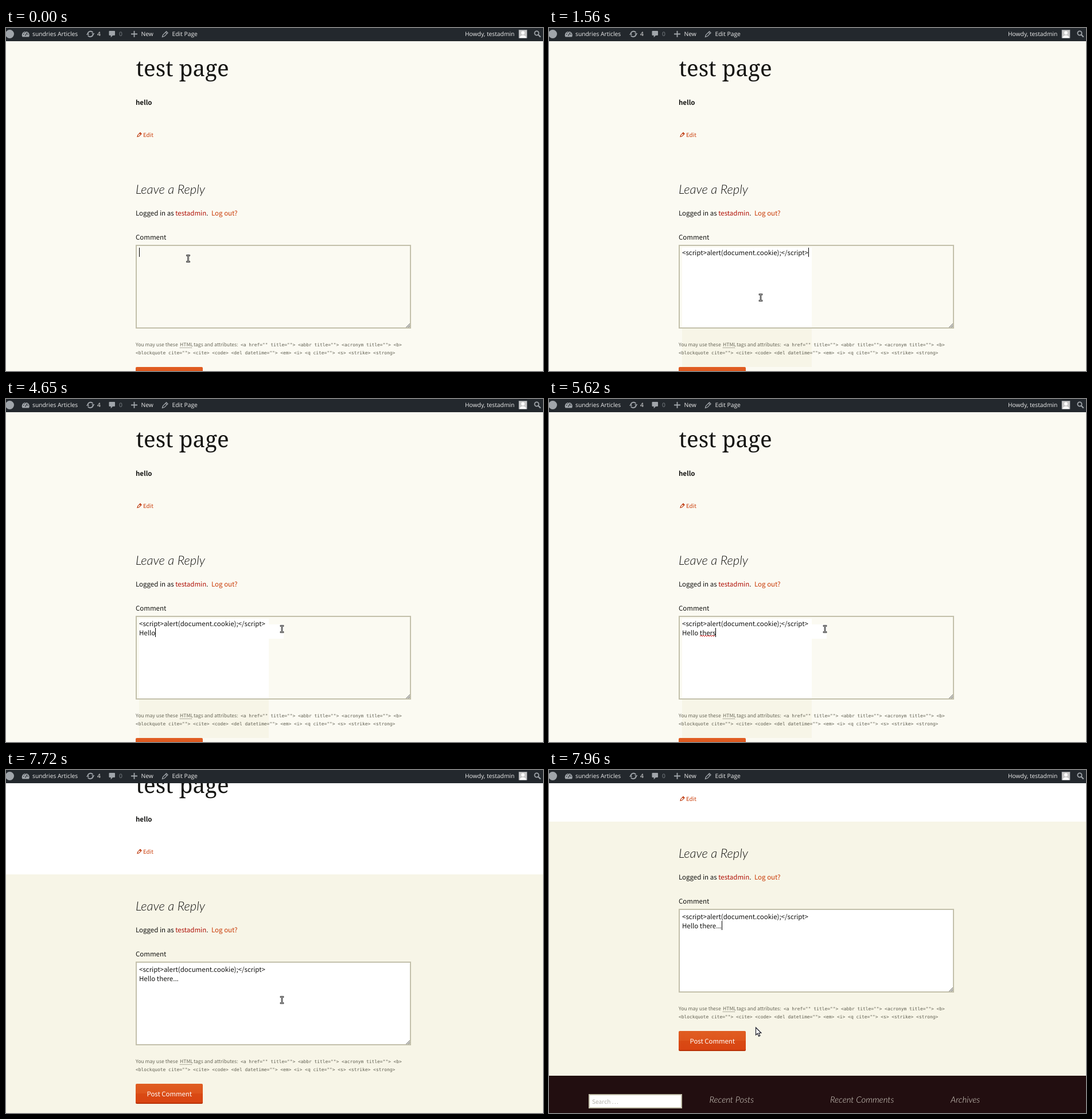
An HTML page for the animation above (8000 ms loop, 936 px wide and 598 px high).

```html
<!DOCTYPE html>
<html lang="en">
<head>
<meta charset="utf-8">
<title>Comment form</title>
<style>
  html, body { margin: 0; width: 100%; height: 100%; overflow: hidden; background: #fbfaf2; }
  svg { display: block; width: 936px; height: 598px; }
  text { white-space: pre; text-rendering: geometricPrecision; fill: #141412;
    font: 11.5px "Noto Sans CJK JP", "Noto Sans CJK SC", "Noto Sans CJK", "Noto Sans", sans-serif; }
  .title { font: 500 38.6px "Noto Serif", serif; }
  .strong { font-weight: 700; }
  .light { font: italic 300 22px Lato, sans-serif; }
  .foot .light { font-size: 15px; fill: #e2ddd2; }
  .link { fill: #ca3c08; }
  .user { fill: #b01208; }
  .edit { font-size: 9.7px; }
  .hint { font-size: 8.6px; fill: #686758; }
  .code { font: 7.92px "DejaVu Sans Mono", monospace; fill: #5f5e50; }
  .button { fill: #fff; font-size: 11.4px; }
  .search { font-size: 10.2px; fill: #b3b0aa; }
  .bar text { font: 10.3px "Open Sans", sans-serif; fill: #eee; }
  .bar .dim { fill: #7f858a; }
  .menu text { font: 10.3px "Open Sans", sans-serif; fill: #2e3436; }
  .menu .off { fill: #a5a7a6; }
  .menu .lit { fill: #fff; }
  .icon { fill: none; stroke: #a0a5aa; stroke-width: 1.8; }
  .solid { fill: #a0a5aa; }
</style>
</head>
<body>
<svg viewBox="0 0 936 598">
  <defs>
    <linearGradient id="orange" x2="0" y2="1">
      <stop offset="0" stop-color="#e05d22"/>
      <stop offset=".5" stop-color="#de551c"/>
      <stop offset=".53" stop-color="#d94a14"/>
      <stop offset="1" stop-color="#d94412"/>
    </linearGradient>
  </defs>

  <g id="page">
    <g id="sections">
      <rect y="-200" width="936" height="426" fill="#fff"/>
      <rect y="226" width="936" height="443" fill="#f7f5e7"/>
      <rect x="227" y="379" width="478" height="144" fill="#fff"/>
    </g>
    <g id="flat">
      <rect width="936" height="598" fill="#fbfaf2"/>
      <g id="patches"></g>
    </g>

    <text class="title" x="226.500" y="84">test page</text>
    <text class="strong" x="226" y="134">hello</text>
    <path d="M229 189.500l.7-2.800 4.300-4.300 2.100 2.100-4.300 4.300zM232.800 183.500l2.100 2.100" fill="none" stroke="#bc360a" stroke-width="1.100"/>
    <text class="link edit" x="239" y="190">Edit</text>
    <text class="light" x="226" y="289">Leave a Reply</text>
    <text x="226" y="327">Logged in as <tspan class="user">testadmin</tspan>. <tspan class="link" x="358">Log out?</tspan></text>
    <text x="226" y="369">Comment</text>

    <rect x="227" y="379" width="478" height="144" fill="none" stroke="#c3c0ab" stroke-width="2"/>
    <path d="M697 522l7-7v7z" fill="#c4c4c0"/>
    <path d="M697 522l7-7M701 522l3-3" stroke="#92928c"/>
    <text x="232" y="396" id="line1"></text>
    <text x="232" y="412" id="line2"></text>
    <path id="squiggle" fill="none" stroke="#e01b1b"/>
    <rect id="caret" width="1" height="16" fill="#000"/>

    <text class="hint" x="226" y="554.500">You may use these</text>
    <text class="hint" x="303" y="554.500">HTML</text>
    <text class="hint" x="327" y="554.500">tags and attributes:</text>
    <path d="M303 557.500h22" stroke="#686758" stroke-dasharray="1 1"/>
    <text class="code" x="409" y="554.500">&lt;a href="" title=""&gt; &lt;abbr title=""&gt; &lt;acronym title=""&gt; &lt;b&gt;</text>
    <text class="code" x="226" y="568.500">&lt;blockquote cite=""&gt; &lt;cite&gt; &lt;code&gt; &lt;del datetime=""&gt; &lt;em&gt; &lt;i&gt; &lt;q cite=""&gt; &lt;s&gt; &lt;strike&gt; &lt;strong&gt;</text>

    <rect x="226" y="593" width="117" height="33" rx="2" fill="#b93207"/>
    <rect x="226" y="591" width="117" height="33" rx="2" fill="url(#orange)"/>
    <text class="button" x="245.500" y="612.500">Post Comment</text>

    <g class="foot">
      <rect y="669" width="936" height="120" fill="#220e10"/>
      <rect x="70" y="702" width="161" height="23" fill="#fff" stroke="#c3c0ab" stroke-width="2"/>
      <text class="search" x="75" y="717.500">Search <tspan letter-spacing="1.300">...</tspan></text>
      <text class="light" x="279.500" y="716">Recent Posts</text>
      <text class="light" x="490" y="716">Recent Comments</text>
      <text class="light" x="700" y="716">Archives</text>
    </g>
  </g>

  <g class="bar">
    <rect width="936" height="23" fill="#23282d"/>
    <circle class="solid" cx="6.500" cy="10.500" r="7.500"/>
    <path class="solid" d="M28.500 15.500a6.500 6.500 0 1 1 11.500 0z"/>
    <path d="M33.500 13.500l3.500-5.500M30 11h1.500M31.500 7.500l1 1M34.300 6v1.500M38.700 11h-1.500" stroke="#23282d" stroke-width="1.300"/>
    <text x="46" y="14">sundries Articles</text>
    <path class="icon" d="M142.500 9.500a5 5 0 0 1 9-1.500M151.700 11.500a5 5 0 0 1-9 1.500"/>
    <path class="solid" d="M149 9.200h5.500l-2.500 3.300zM139.800 11.800h5.500l-2.700-3.300z"/>
    <text x="159" y="14">4</text>
    <path class="solid" d="M180.500 5h8.500a1 1 0 0 1 1 1v6a1 1 0 0 1-1 1h-3l-3.300 3.500v-3.500h-2.200a1 1 0 0 1-1-1v-6a1 1 0 0 1 1-1z"/>
    <text class="dim" x="197" y="14">0</text>
    <path class="icon" d="M218 10.500h11M223.500 5v11"/>
    <text x="235.500" y="14">New</text>
    <path class="icon" style="stroke-width:1.300" d="M272.500 15.500l1-3.500 6-6 2.500 2.500-6 6zM278 7.500l2.500 2.500"/>
    <text x="289.500" y="14">Edit Page</text>
    <text x="800" y="14">Howdy, testadmin</text>
    <rect x="894" y="3.500" width="14" height="14" fill="#c9c9c9" stroke="#a0a5aa" stroke-width=".6"/>
    <circle cx="901" cy="8.500" r="2.900" fill="#fff"/>
    <path d="M895.500 17.200c0-6 11-6 11 0z" fill="#fff"/>
    <circle class="icon" cx="925" cy="9" r="3.600"/>
    <path class="icon" style="stroke-width:2.200" d="M927.700 11.700l4 4"/>
  </g>

  <g id="menu" class="menu">
    <rect x="311.500" y="395.500" width="146" height="195" fill="#f4f4f2" stroke="#b4b4b0"/>
    <rect id="lit" x="312" width="145" height="19" fill="#4a90d9"/>
  </g>

  <g id="beam" fill="none" stroke-linecap="square">
    <path d="M-2-5.500h1.200L0-4.800.8-5.500H2M0-4.800V4.800M-2 5.500h1.200L0 4.800.8 5.500H2" stroke="#111" stroke-width="2.600"/>
    <path d="M-2-5.500h1.200L0-4.800.8-5.500H2M0-4.800V4.800M-2 5.500h1.200L0 4.800.8 5.500H2" stroke="#fff" stroke-width=".8"/>
  </g>
  <path id="arrow" d="M0 0v13l3-2.700 2 4.800 2.300-1-2-4.600h4z" fill="#fff" stroke="#1c1c28" stroke-width="1.200"/>
</svg>

<script>
const LOOP = 8000;
const $ = id => document.getElementById(id);
const NS = "http://www.w3.org/2000/svg";

function add(parent, tag, attrs, text = "") {
  const el = document.createElementNS(NS, tag);
  for (const key in attrs) el.setAttribute(key, attrs[key]);
  el.textContent = text;
  return parent.appendChild(el);
}
const show = (el, on) => { el.style.display = on ? "" : "none"; };
const move = (el, x, y) => el.setAttribute("transform", `translate(${x} ${y})`);

// Each track holds [start, ...values]; the latest started step applies.
const mouse = [
  [0, "beam", 317.5, 402], [150, "arrow", 317, 402], [430, "arrow", 337, 425],
  [550, "arrow", 358, 445], [700, "arrow", 369, 465], [850, "arrow", 368, 465],
  [1000, "arrow", 368, 467], [1560, "beam", 369, 470], [1710, "beam", 300, 452],
  [1830, "beam", 265, 432], [1950, "beam", 350, 420], [2070, "beam", 440, 411],
  [2190, "beam", 481, 401], [7960, "arrow", 360.5, 449]
];
const menuRow = [[0, null], [150, ""], [430, "Cut"], [550, "Copy"], [700, "Paste"], [1560, null]];
const first = [[0, ""], [1560, "<script>alert(document.cookie);<\/script>"]];
const second = [
  [0, ""], [4110, "H"], [4230, "He"], [4350, "Hel"], [4510, "Hell"], [4650, "Hello"],
  [4800, "Hello "], [4930, "Hello t"], [5080, "Hello the"], [5230, "Hello ther"],
  [5500, "Hello thers"], [5870, "Hello ther"], [6300, "Hello there."],
  [6450, "Hello there.."], [6570, "Hello there..."]
];
// Caret line, 0 while blinked off.
const caretLine = [
  [0, 1], [700, 0], [1560, 1], [2070, 0], [2470, 1], [3160, 0], [3280, 2],
  [5870, 0], [6020, 2], [6720, 0], [7840, 2]
];
const misspelt = [[0, false], [5620, true], [6020, false]];
const scroll = [[0, 0], [7720, 44], [7840, 123], [7960, 136]];

// Areas repainted in clean colours: [start, x, y, width, height, colour]
const patches = [
  [700, 232, 383, 226, 99, "#fff"],
  [1560, 232, 383, 226, 140, "#fff"],
  [1560, 232, 523, 226, 68, "#f7f5e7"],
  [2190, 458, 393, 26, 25, "#fff"]
].map(([start, x, y, width, height, fill]) =>
  ({ start, el: add($("patches"), "rect", { x, y, width, height, fill }) }));

const rows = {};
let rowTop = 396;
for (const name of ["Undo", "", "Cut", "Copy", "Paste", "Delete", "", "Select All", "",
                    "Check Spelling", "Languages", "", "Inspect Element"]) {
  if (!name) {
    add($("menu"), "path", { d: `M313 ${rowTop + 2.5}h143`, stroke: "#d6d6d2" });
    rowTop += 5;
    continue;
  }
  const off = ["Undo", "Cut", "Copy", "Delete", "Select All"].includes(name);
  const el = add($("menu"), "text", { x: 331, y: rowTop + 13, class: off ? "off" : "" }, name);
  rows[name] = { top: rowTop, el };
  rowTop += 19;
}

function at(track, t) {
  let step = track[0];
  for (const s of track) if (s[0] <= t) step = s;
  return step.slice(1);
}
const setText = (el, s) => { if (el.textContent !== s) el.textContent = s; };
const widthOf = el => el.textContent ? el.getComputedTextLength() : 0;

function drawCaret(line) {
  show($("caret"), line);
  if (!line) return;
  $("caret").setAttribute("x", Math.round(232 + widthOf($("line" + line))));
  $("caret").setAttribute("y", line === 1 ? 383 : 399);
}

let squiggle = "M263 414";
for (let i = 0; i < 13; i++) squiggle += `l2 ${i % 2 ? 2 : -2}`;
$("squiggle").setAttribute("d", squiggle);

function draw(t) {
  const [offset] = at(scroll, t);
  move($("page"), 0, -offset);
  show($("flat"), !offset);
  show($("sections"), offset);
  for (const p of patches) show(p.el, t >= p.start);

  setText($("line1"), at(first, t)[0]);
  setText($("line2"), at(second, t)[0]);
  drawCaret(at(caretLine, t)[0]);
  show($("squiggle"), at(misspelt, t)[0]);

  const [row] = at(menuRow, t);
  show($("menu"), row !== null);
  show($("lit"), row);
  if (row) $("lit").setAttribute("y", rows[row].top);
  rows.Paste.el.classList.toggle("lit", row === "Paste");

  const [kind, x, y] = at(mouse, t);
  for (const id of ["beam", "arrow"]) show($(id), id === kind);
  move($(kind), x, y);
}

const start = performance.now();
function tick() {
  draw((performance.now() - start) % LOOP);
  requestAnimationFrame(tick);
}
tick();
</script>
</body>
</html>
```
